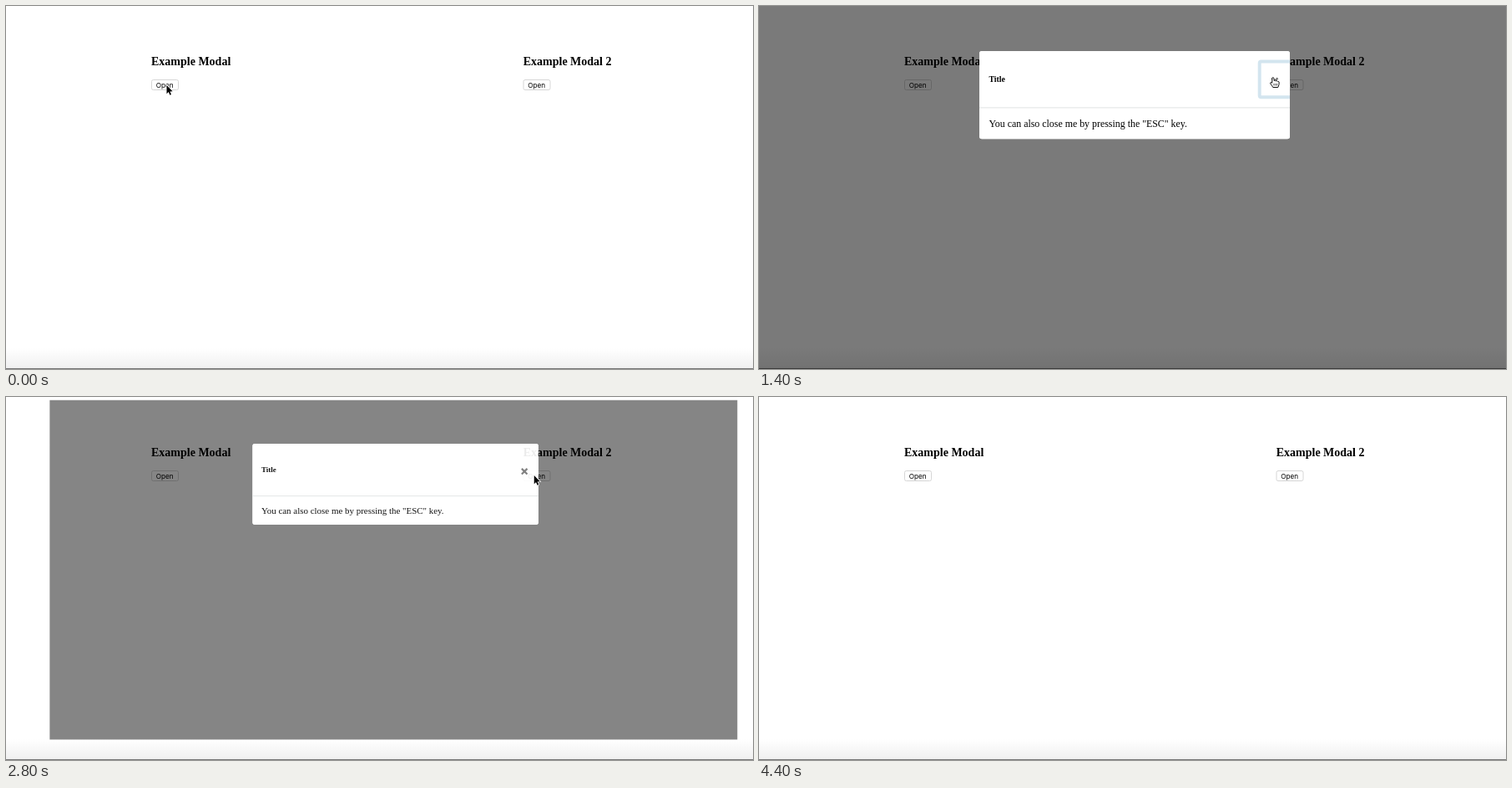
An HTML page with a canvas that plays this animation: 895x435 px, repeating every 5 s.

```html
<!DOCTYPE html>
<html lang="en">
<head>
<meta charset="utf-8">
<title>Example Modal</title>
<style>
  html, body { margin: 0; width: 100%; height: 100%; overflow: hidden; background: #fff; }
  canvas { display: block; }
</style>
</head>
<body>
<canvas id="stage" width="895" height="435"></canvas>
<script>
const W = 895, H = 435, LOOP = 5000, STEP = 100;
const ctx = document.getElementById('stage').getContext('2d');
const SERIF = '"Liberation Serif", Times, serif';
const SANS = 'Inter, "Liberation Sans", sans-serif';

// The overlay is a little taller than the visible stage.
const PAGE = { x: 0, y: -3, w: W, h: 442 };
const MID = { x: W / 2, y: 218 };
const CARD = { x: 264, y: 54, w: 372, h: 105.3, r: 3 };
const START_SCALE = 0.105;

const runs = [
  { x: 190, y: 95, open: 287, close: 1404 },
  { x: 637, y: 95, open: 2415, close: 3472 }
];
const OPEN_MS = 600, CLOSE_MS = 570;

// time, x, y of the pointer
const path = [
  [0, 192.5, 95], [200, 193, 96], [300, 193, 96], [500, 222.3, 119],
  [800, 400, 118], [1200, 611, 91], [1400, 616.6, 85.5], [1800, 617.5, 87],
  [2400, 634, 95], [2600, 635.5, 95], [3000, 630, 93], [3200, 625, 90.5],
  [3500, 619, 88], [3900, 617, 86], [4100, 600, 80], [4200, 578, 72],
  [4300, 478, 2]
];
const POINTER_END = 4400;

const ARROW = [[0, 0], [0, 10.2], [2.3, 8], [3.9, 11.7], [5.5, 11], [3.9, 7.4], [7.1, 7.2]];

// cubic-bezier(.25, .1, .25, 1)
function ease(t) {
  if (t <= 0) return 0;
  if (t >= 1) return 1;
  const curve = (a, b, u) => 3 * a * u * (1 - u) ** 2 + 3 * b * u * u * (1 - u) + u ** 3;
  let lo = 0, hi = 1;
  for (let i = 0; i < 24; i++) {
    const m = (lo + hi) / 2;
    if (curve(0.25, 0.25, m) < t) lo = m; else hi = m;
  }
  return curve(0.1, 1, lo);
}

function modalAt(t) {
  const run = runs.find(r => t >= r.open && t < r.close + CLOSE_MS);
  if (!run) return null;
  const closing = t >= run.close;
  const q = closing ? 1 - ease((t - run.close) / CLOSE_MS) : ease((t - run.open) / OPEN_MS);
  return {
    scale: closing ? q : START_SCALE + (1 - START_SCALE) * q,
    x: run.x + (MID.x - run.x) * q,
    y: run.y + (MID.y - run.y) * q,
    focus: t >= run.close - 80
  };
}

function pointerAt(t) {
  if (t >= POINTER_END) return null;
  const i = path.findIndex(p => p[0] > t);
  if (i < 0) return path[path.length - 1].slice(1);
  const [t0, x0, y0] = path[i - 1], [t1, x1, y1] = path[i];
  const k = (t - t0) / (t1 - t0);
  return [x0 + (x1 - x0) * k, y0 + (y1 - y0) * k];
}

function text(str, x, y, font, color = '#000') {
  ctx.font = font;
  ctx.fillStyle = color;
  ctx.fillText(str, x, y);
}

function drawButton(x) {
  ctx.beginPath();
  ctx.roundRect(x + 0.5, 88.5, 32, 12, 2);
  ctx.fillStyle = '#fff';
  ctx.fill();
  ctx.strokeStyle = '#d6d6d6';
  ctx.lineWidth = 1;
  ctx.stroke();
  text('Open', x + 5.8, 97.7, '8.2px ' + SANS);
}

function drawPage() {
  ctx.fillStyle = '#fff';
  ctx.fillRect(0, 0, W, H);
  const fade = ctx.createLinearGradient(0, 410, 0, 434);
  fade.addColorStop(0, '#fff');
  fade.addColorStop(1, '#f0f0f0');
  ctx.fillStyle = fade;
  ctx.fillRect(0, 410, W, 24);
  ctx.fillStyle = '#777';
  ctx.fillRect(0, 434, W, 1);
  text('Example Modal', 174, 71, 'bold 14px ' + SERIF);
  text('Example Modal 2', 619.7, 71, 'bold 14px ' + SERIF);
  drawButton(174);
  drawButton(619.5);
}

function cardPath() {
  ctx.roundRect(CARD.x, CARD.y, CARD.w, CARD.h, CARD.r);
}

function drawModal(m) {
  ctx.save();
  ctx.translate(m.x, m.y);
  ctx.scale(m.scale, m.scale);
  ctx.translate(-MID.x, -MID.y);
  ctx.globalAlpha = m.scale;

  ctx.beginPath();
  ctx.rect(PAGE.x, PAGE.y, PAGE.w, PAGE.h);
  cardPath();
  ctx.fillStyle = 'rgba(0, 0, 0, 0.52)';
  ctx.fill('evenodd');

  ctx.beginPath();
  cardPath();
  ctx.fillStyle = '#fff';
  ctx.fill();
  ctx.clip();

  ctx.fillStyle = '#e0e3e3';
  ctx.fillRect(CARD.x, 121.4, CARD.w, 1);
  text('Title', 275.4, 91, 'bold 9.85px ' + SERIF);
  text('You can also close me by pressing the "ESC" key.', 275.4, 144.7, '11.9px ' + SERIF);

  if (m.focus) {
    ctx.strokeStyle = '#d3e5ef';
    ctx.lineWidth = 4;
    ctx.beginPath();
    ctx.roundRect(599.7, 66.5, 50, 42.8, 2);
    ctx.stroke();
  }

  ctx.strokeStyle = '#777';
  ctx.lineWidth = 2.4;
  ctx.beginPath();
  ctx.moveTo(614.3, 86.3); ctx.lineTo(621.5, 93.5);
  ctx.moveTo(621.5, 86.3); ctx.lineTo(614.3, 93.5);
  ctx.stroke();
  ctx.restore();
}

function drawArrow() {
  ctx.beginPath();
  ARROW.forEach(([x, y]) => ctx.lineTo(x, y));
  ctx.closePath();
  ctx.strokeStyle = '#fff';
  ctx.lineWidth = 1.4;
  ctx.stroke();
  ctx.fillStyle = '#000';
  ctx.fill();
}

function drawHand() {
  ctx.beginPath();
  ctx.moveTo(-1.8, 6.6);
  ctx.lineTo(-1.8, 1);
  ctx.quadraticCurveTo(-0.7, -0.8, 0.4, 1);
  ctx.lineTo(0.6, 4);
  ctx.quadraticCurveTo(2, 3, 2.8, 4.4);
  ctx.quadraticCurveTo(4.2, 3.6, 4.9, 5);
  ctx.quadraticCurveTo(6.6, 4.6, 6.6, 6.4);
  ctx.quadraticCurveTo(6.6, 9, 5.2, 12);
  ctx.lineTo(-0.8, 12);
  ctx.quadraticCurveTo(-2, 9.6, -4, 7.4);
  ctx.quadraticCurveTo(-4, 5, -1.8, 6.6);
  ctx.closePath();
  ctx.fillStyle = '#fff';
  ctx.fill();
  ctx.strokeStyle = '#111';
  ctx.lineWidth = 1;
  ctx.lineJoin = 'round';
  ctx.stroke();
  ctx.lineWidth = 0.7;
  ctx.beginPath();
  for (const x of [0.3, 2.2, 4]) {
    ctx.moveTo(x, 7.4);
    ctx.lineTo(x, 10);
  }
  ctx.stroke();
}

function draw(t) {
  drawPage();
  const modal = modalAt(t);
  if (modal) drawModal(modal);
  const pos = pointerAt(t);
  if (!pos) return;
  const [x, y] = pos;
  const onClose = modal && modal.scale > 0.95 && x > 600 && x < 636 && y > 66 && y < 110;
  ctx.save();
  ctx.translate(x, y);
  if (onClose) drawHand(); else drawArrow();
  ctx.restore();
}

const begin = performance.now();
function tick() {
  const t = (performance.now() - begin) % LOOP;
  draw(Math.floor(t / STEP) * STEP);
  requestAnimationFrame(tick);
}
tick();
</script>
</body>
</html>
```
